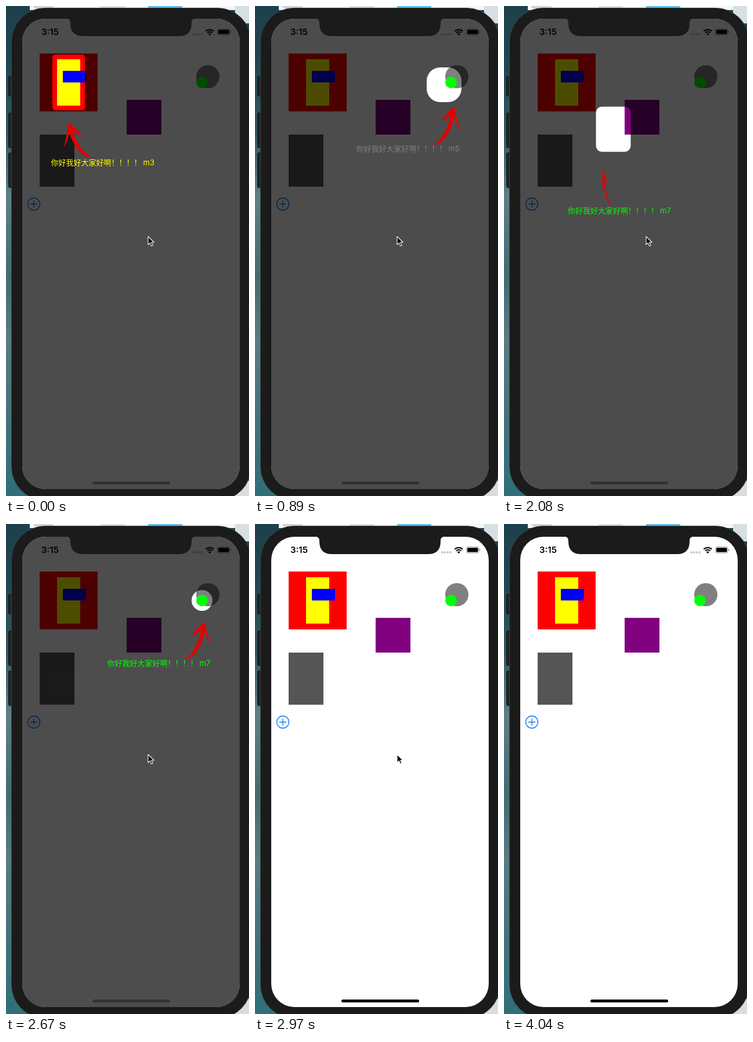
Write an HTML page that moves like this. It is 419x846 px and loops after 4140 ms.

```html
<!DOCTYPE html>
<html lang="zh-CN">
<head>
<meta charset="utf-8">
<title>Guide overlay</title>
<style>
  html, body { margin: 0; width: 100%; height: 100%; overflow: hidden; background: #1b1b1b; }
  svg { display: block; width: 100%; height: 100%; }
  #tip { font: 13px Inter, "Noto Sans CJK SC", "Noto Sans CJK", sans-serif; }
  #clock { font: 600 15px Inter, sans-serif; }
</style>
</head>
<body>
<svg viewBox="0 0 419 846" xmlns="http://www.w3.org/2000/svg">
  <defs>
    <linearGradient id="sea" x1="0" y1="0" x2="0" y2="1">
      <stop offset="0" stop-color="#1d414c"/>
      <stop offset=".12" stop-color="#1f4651"/>
      <stop offset=".26" stop-color="#34585f"/>
      <stop offset=".39" stop-color="#5d8086"/>
      <stop offset=".55" stop-color="#446b70"/>
      <stop offset=".68" stop-color="#587c82"/>
      <stop offset=".85" stop-color="#43727a"/>
      <stop offset="1" stop-color="#2f6f78"/>
    </linearGradient>
    <clipPath id="glass"><rect x="28" y="22" width="375" height="812" rx="40"/></clipPath>
  </defs>

  <!-- desktop -->
  <rect width="419" height="846" fill="url(#sea)"/>
  <rect x="41" width="378" height="7" fill="#f4f6f6"/>
  <rect x="48" width="34" height="4" fill="#d2d4d2"/>
  <rect x="82" width="81" height="4" fill="#fafafa"/>
  <rect x="163" width="42" height="4" fill="#dcdcd6"/>
  <rect x="245" width="59" height="4" fill="#62bdec"/>
  <rect x="395" width="24" height="30" fill="#d6e0e2"/>
  <rect x="380" y="820" width="39" height="26" fill="#dcdcdc"/>

  <!-- phone -->
  <g fill="#242424" stroke="#101010">
    <rect x="4.500" y="121.500" width="8" height="34" rx="2"/>
    <rect x="4.500" y="184.500" width="8" height="60" rx="2"/>
    <rect x="4.500" y="253.500" width="8" height="60" rx="2"/>
  </g>
  <rect x="9.500" y="3.500" width="413" height="850" rx="58" fill="#1b1b1b" stroke="#3b3f40"/>

  <g clip-path="url(#glass)">
    <rect x="28" y="22" width="375" height="812" fill="#fff"/>
    <rect x="58" y="82" width="100" height="100" fill="#f00"/>
    <rect x="88" y="92" width="40" height="80" fill="#ff0"/>
    <rect x="98" y="112" width="40" height="20" fill="#00f"/>
    <circle cx="348" cy="122" r="20" fill="#808080"/>
    <circle cx="338" cy="132" r="10" fill="#0f0"/>
    <rect x="208" y="162" width="60" height="60" fill="#800080"/>
    <rect x="58" y="222" width="60" height="90" fill="#555"/>
    <path d="M37.500 342a10.500 10.500 0 1 0 21 0a10.500 10.500 0 1 0 -21 0M42 342h12M48 336v12"
      fill="none" stroke="#007aff" stroke-width="1.3"/>

    <g fill="#000" fill-opacity=".22">
      <circle cx="323" cy="49" r="1.900"/><circle cx="327.700" cy="49" r="1.900"/>
      <circle cx="332.400" cy="49" r="1.900"/><circle cx="337.100" cy="49" r="1.900"/>
    </g>

    <g id="guide">
      <path id="shade" fill="#000" fill-opacity=".7" fill-rule="evenodd"/>
      <path id="arrow" fill="#e60000" d="M0 0C13 -3 26 -22 34 -48L21 -40Q18 -42 22 -46C28 -51 33 -57 38 -61
        Q41 -63 42 -59C43 -48 45 -34 51 -20C45 -28 42 -36 40 -46C33 -22 20 1 0 0Z"/>
      <text id="tip">你好我好大家好啊！！！！<tspan id="num" x="159"></tspan></text>
    </g>

    <!-- status bar -->
    <text id="clock" x="61" y="50">3:15</text>
    <g fill="none" stroke="#000" stroke-width="2">
      <path d="M344.400 43.600a9.600 9.600 0 0 1 13.800 0M347 46.400a6 6 0 0 1 8.600 0"/>
    </g>
    <path d="M351.300 51l-2.400 -2.500a3.400 3.400 0 0 1 4.800 0z"/>
    <rect x="364.500" y="39.500" width="21.500" height="10.500" rx="2.800" fill="none" stroke="#000" stroke-opacity=".4"/>
    <rect x="366" y="41" width="18.500" height="7.500" rx="1.500"/>
    <path d="M387 43v3.500q1.500 -.500 1.500 -1.750t-1.500 -1.750z" fill-opacity=".45"/>
    <rect id="home" x="149" y="821" width="134" height="5" rx="2.500"/>
  </g>
  <path d="M103 21.500C109 22 111 24 111 30Q111 52 133 52H298Q320 52 320 30C320 24 322 22 328 21.500Z" fill="#1b1b1b"/>

  <path id="cursor" d="M0 0V14L3.300 10.900L5.600 16.200L8 15.200L5.700 10H10.200Z"
    fill="#000" stroke="#fff" stroke-width="1.100" stroke-linejoin="round"/>
</svg>

<script>
const LOOP = 4140;
const $ = id => document.getElementById(id);

const ticks = [0, 150, 300, 450, 750, 890, 1040, 1490, 1630, 1780, 2080,
  2220, 2370, 2670, 2820, 2970, 3120, 3260, 3410, 3560, 3710];

// hole: x, y, w, h, radius; text: x, y; arrow: tail x, tail y, x scale, angle
const steps = [
  { name: 'm3', color: '#ff0', start: -1000, time: 260,
    hole: [80, 84, 56, 96, 5], text: [77.5, 270], arrow: [151, 262, -1, -3] },
  { name: 'm4', color: '#800080', start: 44, time: 262,
    hole: [200, 154, 76, 76, 5], text: [174.5, 320], arrow: [200, 311, 1, 0] },
  { name: 'm5', color: '#808080', start: 666, time: 280,
    hole: [320, 94, 56, 56, 28], text: [174.5, 240], arrow: [316, 233, 1, -4] },
  { name: 'm6', color: '#fff', start: 1350, time: 290,
    hole: [50, 214, 76, 106, 5], text: [77.5, 410], arrow: [124, 401, -1, 0] },
  { name: 'm7', color: '#0f0', start: 1965, time: 286,
    hole: [320, 114, 36, 36, 18], text: [174.5, 240], arrow: [306, 234, 1, -4] }
];
const fade = { start: 2663, time: 217 };

// time, x, y
const pointer = [[2970, 245, 398], [3120, 245, 406], [3260, 257, 528],
  [3410, 302, 709], [3560, 371, 834], [3710, 430, 920]];

const clamp = v => Math.min(1, Math.max(0, v));
const mix = (a, b, p) => a.map((v, i) => v + (b[i] - v) * p);
const part = (t, { start, time }) => clamp((t - start) / time);

// cubic-bezier(.42, 0, .58, 1)
function ease(x) {
  let lo = 0, hi = 1;
  for (let i = 0; i < 20; i++) {
    const s = (lo + hi) / 2, q = 1 - s;
    if (1.26 * s * q * q + 1.74 * s * s * q + s * s * s < x) lo = s; else hi = s;
  }
  return lo * lo * (3 - 2 * lo);
}

function roundRect([x, y, w, h, r]) {
  const arc = (dx, dy) => `a${r} ${r} 0 0 1 ${dx} ${dy}`;
  return `M${x + r} ${y}h${w - 2 * r}${arc(r, r)}v${h - 2 * r}${arc(-r, r)}` +
    `h${2 * r - w}${arc(-r, -r)}v${2 * r - h}${arc(r, -r)}z`;
}

function pointerAt(t) {
  const i = pointer.findIndex(k => k[0] > t);
  if (i === 0) return pointer[0];
  if (i < 0) return pointer[pointer.length - 1];
  const a = pointer[i - 1], b = pointer[i];
  return mix(a, b, (t - a[0]) / (b[0] - a[0]));
}

function draw(t) {
  const i = steps.findLastIndex(s => t >= s.start);
  const to = steps[i], from = steps[Math.max(0, i - 1)];
  const p = part(t, to), e = ease(p);

  $('shade').setAttribute('d', 'M28 22h375v812h-375z' + roundRect(mix(from.hole, to.hole, p)));

  const [ax, ay, sx, angle] = mix(from.arrow, to.arrow, e);
  $('arrow').setAttribute('transform', `translate(${ax} ${ay}) rotate(${angle}) scale(${sx} 1)`);

  const [x, y] = mix(from.text, to.text, e);
  $('tip').setAttribute('transform', `translate(${x} ${y + 4.7})`);
  $('tip').setAttribute('fill', to.color);
  $('num').textContent = to.name;

  const gone = ease(part(t, fade));
  $('guide').setAttribute('opacity', 1 - gone);
  $('home').setAttribute('fill', gone > .5 ? '#000' : '#323232');

  const [, cx, cy] = pointerAt(t);
  $('cursor').setAttribute('transform', `translate(${cx} ${cy})`);
}

function loop(now) {
  const t = now % LOOP;
  draw(ticks.findLast(k => k <= t));
  requestAnimationFrame(loop);
}
draw(0);
requestAnimationFrame(loop);
</script>
</body>
</html>
```
